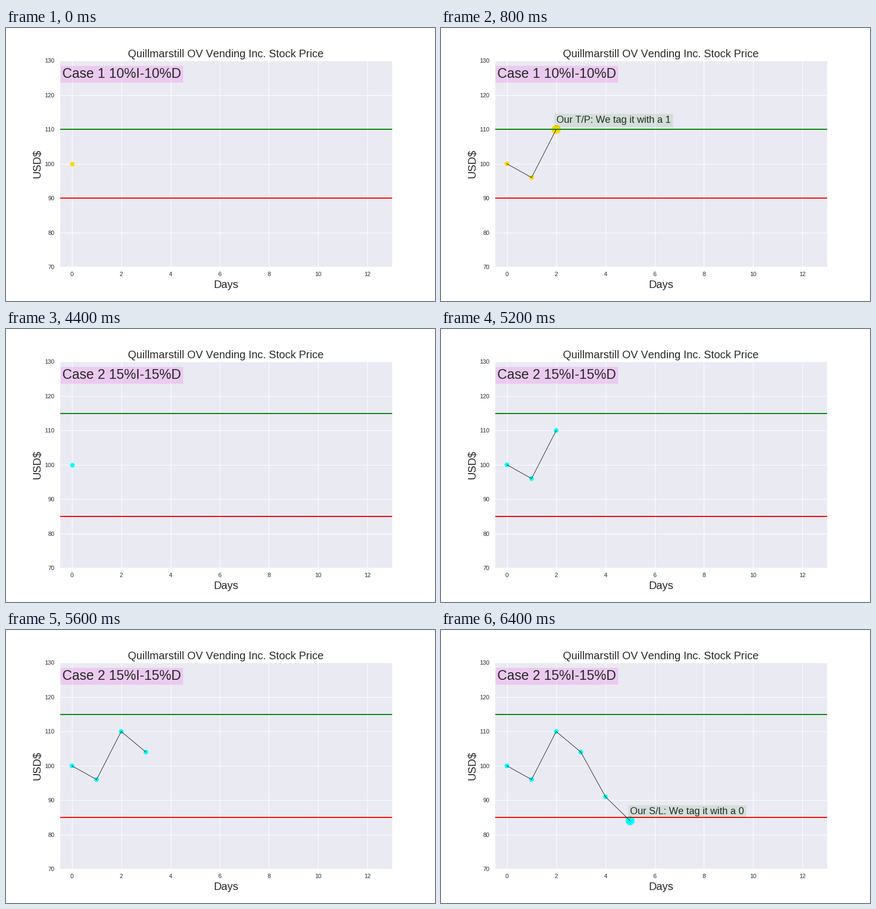
A matplotlib script for the animation above (8000 ms loop, 792x504 px).

```python
import matplotlib.pyplot as plt
from matplotlib.animation import FuncAnimation

plt.rcParams.update({
    "font.family": "Liberation Sans", "text.kerning_factor": 6,
    "text.color": ".15", "axes.labelcolor": ".15",
    "xtick.labelcolor": ".15", "ytick.labelcolor": ".15",
    "axes.facecolor": "#EAEAF2", "axes.edgecolor": "white", "axes.linewidth": 1.25,
    "axes.grid": True, "axes.axisbelow": True,
    "grid.color": "white", "grid.linewidth": 1, "grid.linestyle": "-",
    "xtick.labelsize": 11, "ytick.labelsize": 11,
    "xtick.major.size": 6, "ytick.major.size": 6,
    "xtick.bottom": False, "ytick.left": False,
    "patch.edgecolor": "white", "patch.force_edgecolor": True, "patch.linewidth": 1,
})

STEP_MS = 400
PRICES = [100, 96, 110, 104, 91, 84]
SMALL, LARGE = 50, 230

# start frame, last day, band in percent, dot colour, closing note
CASES = [
    (0, 2, 10, "gold", "Our T/P: We tag it with a 1"),
    (11, 5, 15, "cyan", "Our S/L: We tag it with a 0"),
]
FRAMES = 20

fig, ax = plt.subplots(figsize=(11, 7), dpi=72)
fig.subplots_adjust(left=0.125, right=0.9, bottom=0.125, top=0.88)
ax.set(xlim=(-0.5, 13), ylim=(70, 130), xticks=range(0, 13, 2))
ax.set_title("Quillmarstill OV Vending Inc. Stock Price", fontsize=20)
ax.set_xlabel("Days", fontsize=20)
ax.set_ylabel("USD$", fontsize=20)

upper = ax.axhline(110, color="green", lw=2)
lower = ax.axhline(90, color="red", lw=2)
path, = ax.plot([], [], color="black", lw=0.8)
dots = ax.scatter([], [], s=SMALL, linewidths=1.5)
heading = ax.text(-0.4, 125, "", fontsize=25,
                  bbox=dict(facecolor="violet", alpha=0.3))
note = ax.text(0, 0, "", fontsize=18, bbox=dict(facecolor="green", alpha=0.1))


def update(frame):
    number = 2 if frame >= CASES[1][0] else 1
    start, last, band, color, message = CASES[number - 1]
    day = min(frame - start, last)
    closed = day == last
    days, prices = list(range(day + 1)), PRICES[:day + 1]

    heading.set_text(f"Case {number} {band}%I-{band}%D")
    upper.set_ydata([100 + band] * 2)
    lower.set_ydata([100 - band] * 2)
    path.set_data(days, prices)
    dots.set_offsets(list(zip(days, prices)))
    dots.set_sizes([SMALL] * day + [LARGE if closed else SMALL])
    dots.set_color(color)
    note.set_text(message)
    note.set_position((day, prices[-1] + 2))
    note.set_visible(closed)
    return upper, lower, path, dots, heading, note


anim = FuncAnimation(fig, update, frames=FRAMES, interval=STEP_MS,
                     repeat=True, repeat_delay=0)
plt.show()
```
